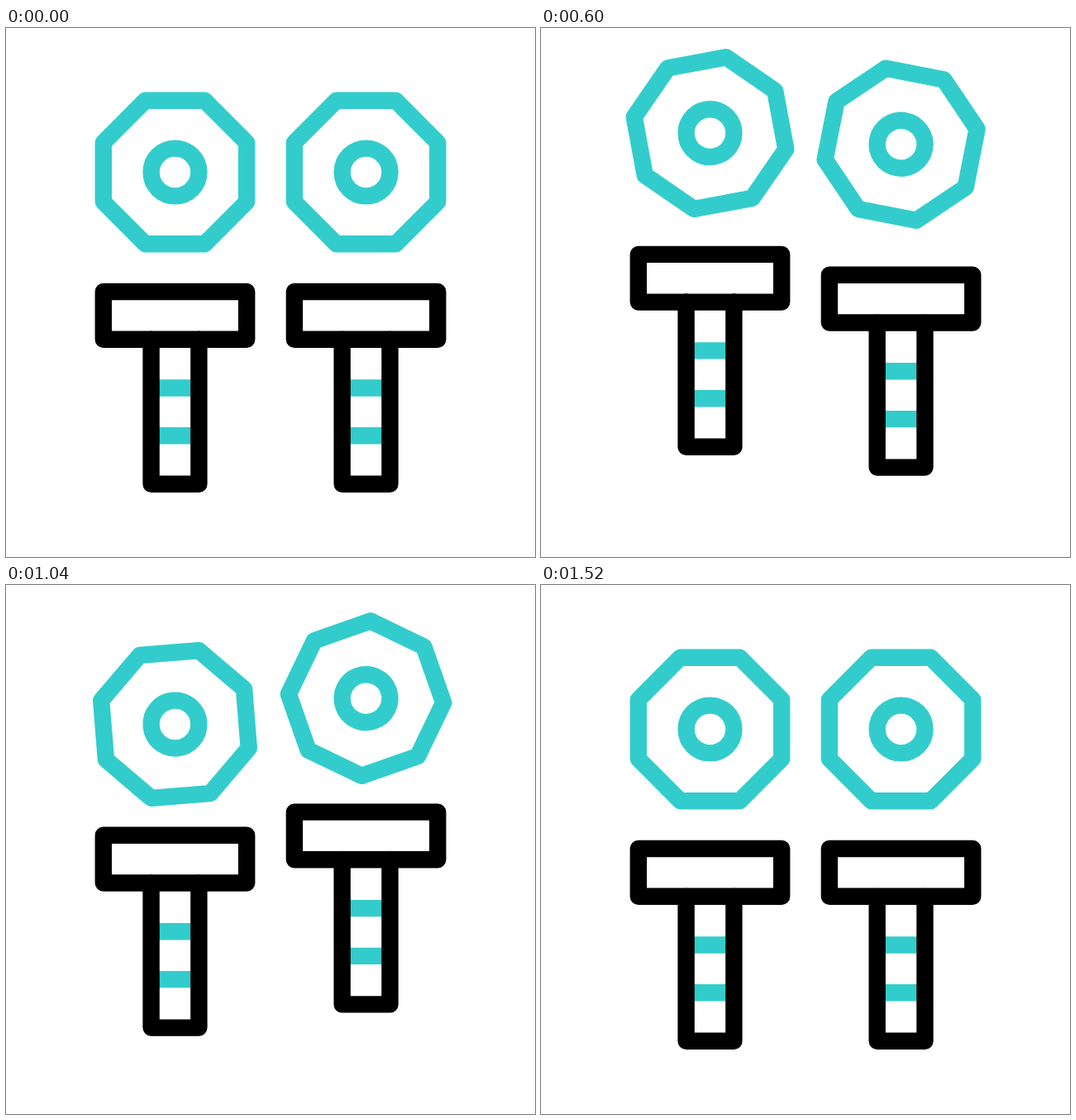
An HTML page for the animation above (1600 ms loop, 640x640 px).

```html
<!DOCTYPE html>
<html lang="en">
<head>
<meta charset="utf-8">
<title>Nuts and bolts</title>
<style>
  html, body { margin: 0; width: 100%; height: 100%; overflow: hidden; background: #fff; }
  svg { display: block; width: 100%; height: 100%; }
  .nut, .bolt { fill: none; stroke-width: 20.4; stroke-linejoin: round; }
  .nut, .band { stroke: #3cc; }
  .body { stroke: #000; stroke-linecap: round; }
</style>
</head>
<body>
<svg viewBox="0 0 640 640">
  <defs>
    <g id="nut" class="nut">
      <path d="M-35.9-86.7H35.9L86.7-35.9V35.9L35.9 86.7H-35.9L-86.7 35.9V-35.9Z"/>
      <circle r="28.9"/>
    </g>
    <g id="bolt" class="bolt">
      <path class="band" d="M-28.9 435.5H28.9M-28.9 493.3H28.9"/>
      <path class="body" d="M-86.7 319H86.7V376.7H-86.7ZM-28.9 376.4V551.8H28.9V376.4"/>
    </g>
  </defs>
  <use href="#nut"/>
  <use href="#bolt"/>
  <use href="#nut"/>
  <use href="#bolt"/>
</svg>
<script>
  const LOOP = 1600, STEP = 40, LIFT = 47.5, NUT_Y = 174.5;
  const parts = [...document.querySelectorAll('svg > use')].map((el, i) => ({
    el,
    isNut: i % 2 === 0,
    x: i < 2 ? 204.5 : 435.6,
    delay: [0, 80, 200, 280][i]
  }));

  // Progress along cubic-bezier(a, 0, 1 - a, 1)
  function ease(x, a) {
    if (x <= 0) return 0;
    if (x >= 1) return 1;
    let lo = 0, hi = 1, s;
    for (let i = 0; i < 24; i++) {
      s = (lo + hi) / 2;
      const bx = s + (3 * a - 1) * s * (1 - s) * (1 - 2 * s);
      if (bx < x) lo = s; else hi = s;
    }
    return s * s * (3 - 2 * s);
  }

  const rise = t => t < 630
    ? ease((t - 50) / 580, 0.54)
    : 1 - ease((t - 630) / 580, 0.583);
  const turn = t => 90 * ease((t - 44) / 1240, 0.567);

  function draw(time) {
    for (const { el, isNut, x, delay } of parts) {
      const t = time - delay;
      const y = (isNut ? NUT_Y : 0) - LIFT * rise(t);
      const spin = isNut ? ` rotate(${turn(t)})` : '';
      el.setAttribute('transform', `translate(${x} ${y})${spin}`);
    }
  }

  const start = performance.now();
  function tick() {
    const t = (performance.now() - start) % LOOP;
    draw(Math.floor(t / STEP) * STEP);
    requestAnimationFrame(tick);
  }
  draw(0);
  requestAnimationFrame(tick);
</script>
</body>
</html>
```
